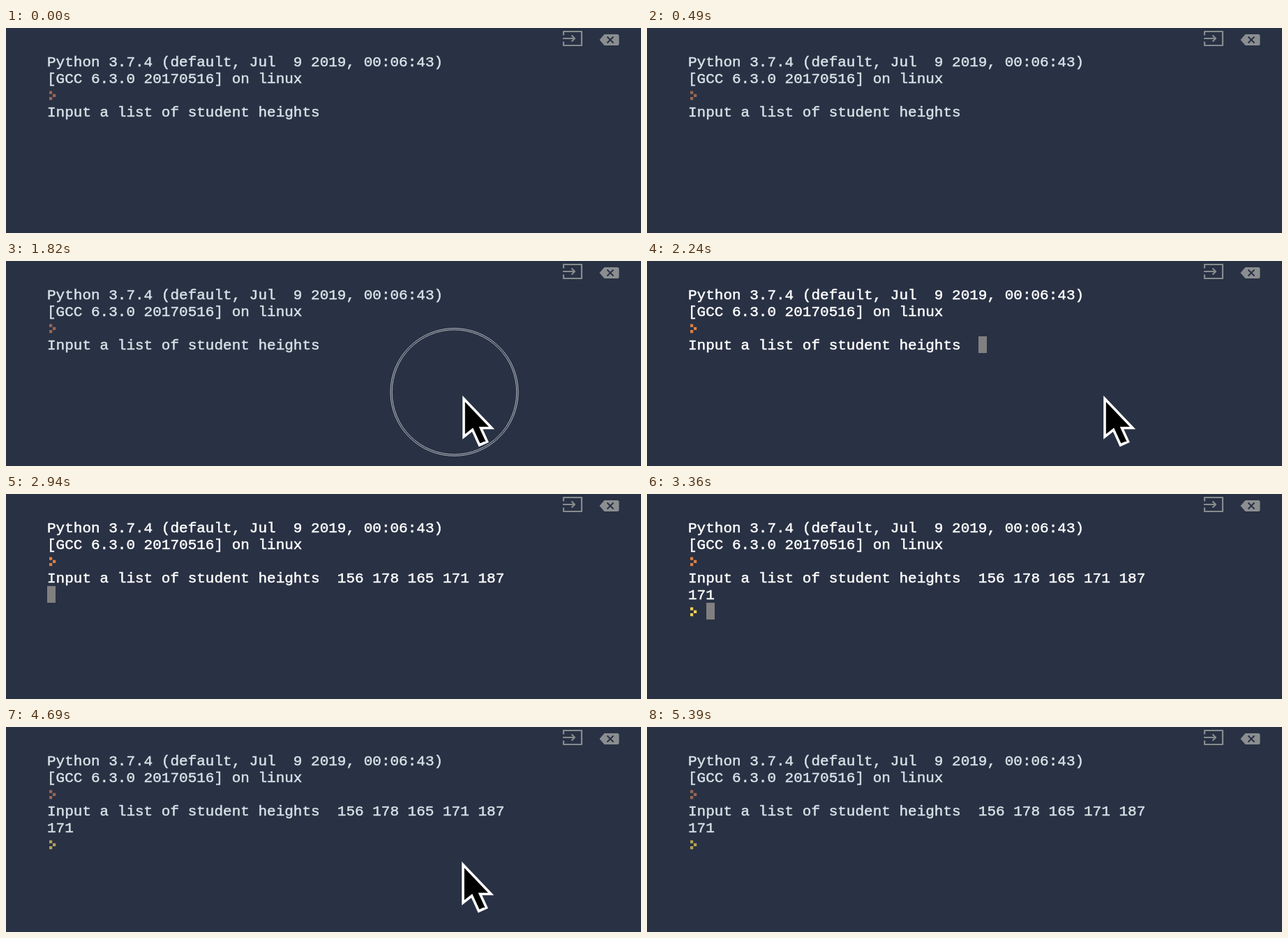
Animation of 910x294 px, one loop 5.81 s. Source, as an HTML page:

```html
<!DOCTYPE html>
<html lang="en">
<head>
<meta charset="utf-8">
<title>Console session</title>
<style>
  html, body { margin: 0; width: 100%; height: 100%; overflow: hidden; background: #293144; }
  svg { display: block; width: 910px; height: 294px; }
  text { font: 21px "Liberation Mono", "Noto Sans Mono", monospace; white-space: pre; }
</style>
</head>
<body>
<svg viewBox="0 0 910 294">
  <defs>
    <path id="chevron" d="M0 0h4.2v4.2h-4.2z M5 4.3h4.2v4.2h-4.2z M0 8.6h4.2v4.2h-4.2z"/>
  </defs>
  <rect width="910" height="294" fill="#293144"/>

  <g id="icons" fill="none" stroke="#878b8e" stroke-width="2.2" stroke-linejoin="round">
    <path d="M799 10.5V5H825V25H799V19.5"/>
    <path d="M798 15H815M810.5 10.5L815 15L810.5 19.5"/>
    <path d="M850.5 17L857.5 9H876Q878.5 9 878.5 11.5V22.5Q878.5 25 876 25H857.5Z" fill="#8b8e90" stroke="none"/>
    <path d="M861.5 12.5L870.5 21.5M870.5 12.5L861.5 21.5" stroke="#293144" stroke-width="2"/>
  </g>

  <g id="output" stroke-width="0.5">
    <text x="59" y="55">Python 3.7.4 (default, Jul  9 2019, 00:06:43)</text>
    <text x="59" y="79">[GCC 6.3.0 20170516] on linux</text>
    <text x="59" y="127">Input a list of student heights</text>
    <text id="numbers" x="474.8" y="127">156 178 165 171 187</text>
    <text id="result" x="59" y="151">171</text>
  </g>
  <use id="prompt" href="#chevron" x="62" y="90.5"/>
  <use id="nextPrompt" href="#chevron" x="62" y="162.5"/>
  <rect id="caret" width="12" height="24" fill="#808080"/>

  <g id="ripple" fill="none" stroke="#e2e8ea" stroke-width="0.9">
    <circle id="outer" cx="642.5" cy="188"/>
    <circle id="inner" cx="642.5" cy="188"/>
  </g>
  <path id="pointer" d="M656 197.5V252L668.5 242L678.5 264L689.5 259L680.5 239.5H696Z"
        fill="#000" stroke="#fff" stroke-width="3.6"/>
</svg>
<script>
const LOOP = 5810, STEP = 70;
const PASTE = 2310, ENTER = 2940, PRINT = 3080;
const $ = id => document.getElementById(id);

// Tracks are rows of [time, value, ...].
const focusTrack = [[1820, 0], [2030, 1], [3640, 1], [3850, 0]];
const rippleTrack = [[1610, 26, 1], [1680, 54, 1], [1750, 76, 1], [1820, 91.5, 1], [1960, 91.5, 0]];
const enterTrack = [[980, -66, 84], [1050, -32, 34], [1120, -9, 9], [1190, 0, 0]];
const leaveTrack = [[4690, -1, 0], [4760, -10, 24], [4830, -24, 64], [4900, -40, 110]];

const mix = (a, b, k) => a + (b - a) * k;

function sample(track, t) {
  const next = track.findIndex(row => row[0] > t);
  if (next === 0) return track[0].slice(1);
  if (next < 0) return track[track.length - 1].slice(1);
  const a = track[next - 1], b = track[next];
  const k = (t - a[0]) / (b[0] - a[0]);
  return a.slice(1).map((v, i) => mix(v, b[i + 1], k));
}

const blend = (from, to, k) => `rgb(${from.map((v, i) => Math.round(mix(v, to[i], k)))})`;
const show = (id, on) => $(id).setAttribute("visibility", on ? "visible" : "hidden");

function place(id, attrs) {
  for (const name in attrs) $(id).setAttribute(name, attrs[name]);
}

function draw(t) {
  const [focus] = sample(focusTrack, t);
  const ink = blend([214, 226, 231], [255, 255, 255], focus);
  place("output", { fill: ink, stroke: ink });
  place("prompt", { fill: blend([155, 103, 84], [222, 128, 67], focus) });
  place("nextPrompt", { fill: blend([178, 164, 84], [236, 208, 82], focus) });

  show("numbers", t >= PASTE);
  show("result", t >= PRINT);
  show("nextPrompt", t >= PRINT);

  const [x, y] = t < PASTE ? [475, 108] : t < ENTER ? [715, 108]
    : t < PRINT ? [59, 132] : [85, 156];
  place("caret", { x, y, opacity: focus });

  const [radius, alpha] = sample(rippleTrack, t);
  show("ripple", t >= 1610 && t < 1960);
  place("ripple", { opacity: alpha * 0.85 });
  place("outer", { r: radius });
  place("inner", { r: radius - 2.2 });

  const leaving = t >= 4690;
  show("pointer", leaving ? t < 4900 : t >= 980 && t < ENTER);
  place("pointer", { transform: `translate(${sample(leaving ? leaveTrack : enterTrack, t)})` });
}

const start = performance.now();
function tick() {
  const t = (performance.now() - start) % LOOP;
  draw(Math.floor(t / STEP) * STEP);
  requestAnimationFrame(tick);
}
tick();
</script>
</body>
</html>
```
